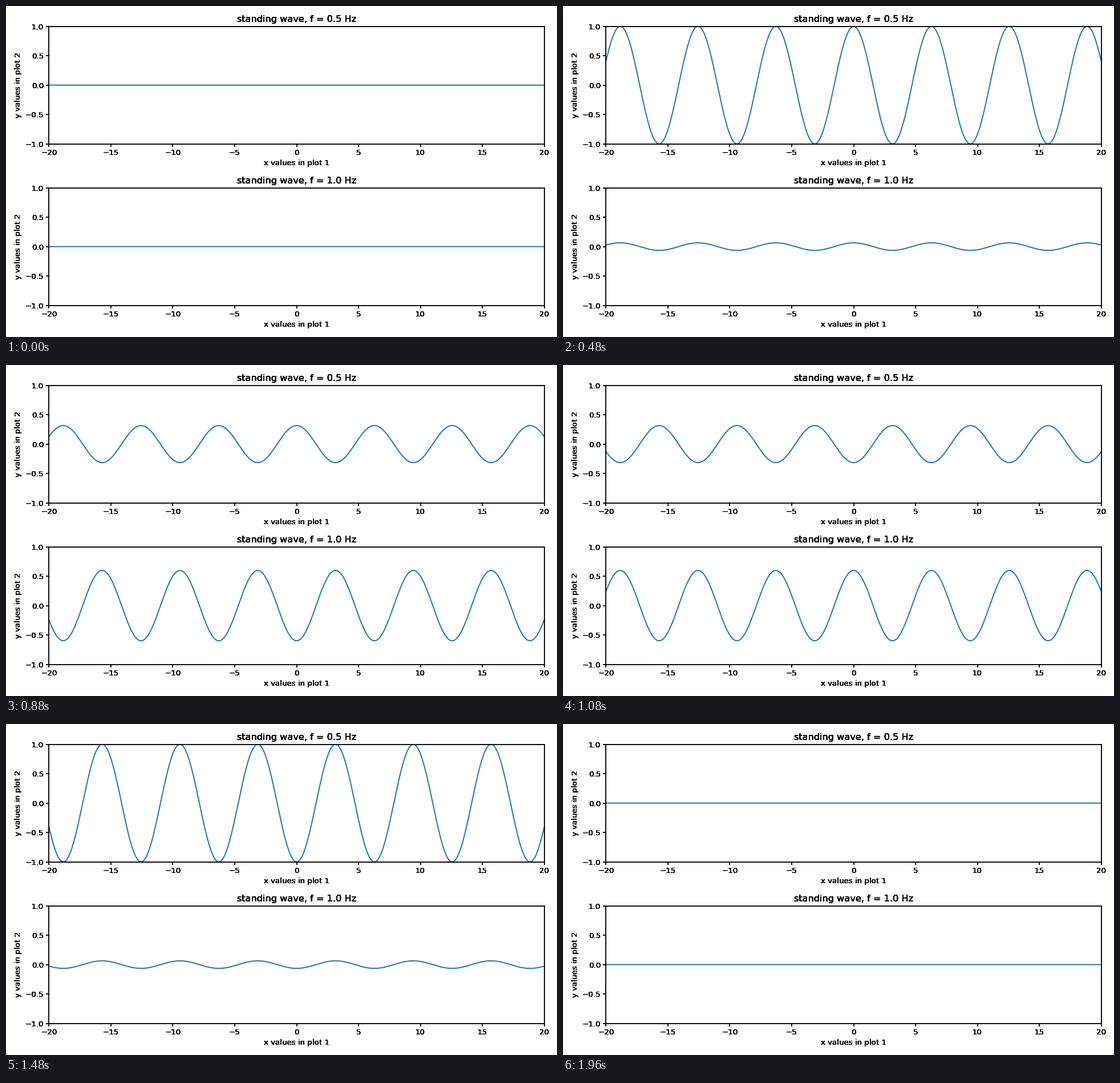
These frames come from a looping animation (966 px wide and 580 px high, 2000 ms). A matplotlib script:

```python
import numpy as np
import matplotlib.pyplot as plt
from matplotlib.animation import FuncAnimation
from matplotlib.text import Text

W, H, DPI = 966, 580, 96
FRAMES, INTERVAL = 50, 40
LEFT, RIGHT = 75.4, 943.6
LINE = 1.4
PASSES = 7

plt.rcParams.update({
    "font.family": "DejaVu Sans",
    "font.size": 10.06,
    "axes.linewidth": LINE,
    "xtick.major.width": LINE,
    "ytick.major.width": LINE,
})

fig = plt.figure(figsize=(W / DPI, H / DPI), dpi=DPI, facecolor="white")
x = np.linspace(-20, 20, 1000)
times = np.linspace(0, 2, FRAMES)


def add_plot(top, bottom, freq):
    ax = fig.add_axes(
        [LEFT / W, 1 - bottom / H, (RIGHT - LEFT) / W, (bottom - top) / H])
    ax.set(xlim=(-20, 20), ylim=(-1, 1),
           xticks=np.arange(-20, 21, 5), yticks=np.arange(-1, 1.1, 0.5),
           xlabel="x values in plot 1", ylabel="y values in plot 2",
           title=f"standing wave, f = {freq} Hz")
    line, = ax.plot(x, 0 * x, color="#1f77b4", lw=1.5, snap=False)
    return line, freq


def darken(text):
    """Draw the text several times so that its soft edges turn black."""
    draw = text.draw

    def draw_passes(renderer):
        for _ in range(PASSES):
            draw(renderer)

    text.draw = draw_passes


waves = [add_plot(35.6, 241.6, 0.5), add_plot(318.6, 524.6, 1.0)]
for text in fig.findobj(Text):
    darken(text)


def update(i):
    for line, freq in waves:
        line.set_ydata(np.sin(2 * np.pi * freq * times[i]) * np.cos(x))
    return [line for line, _ in waves]


anim = FuncAnimation(fig, update, frames=FRAMES, interval=INTERVAL,
                     repeat=True, repeat_delay=0)
plt.show()
```
